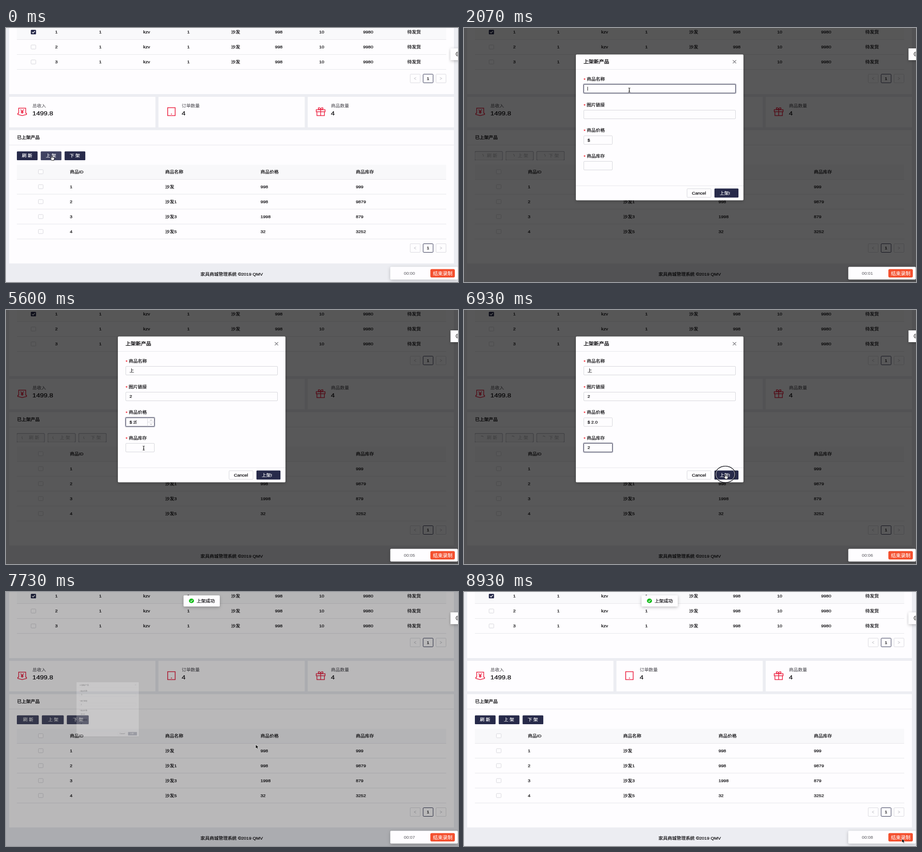
An HTML page that plays this animation: 998 px wide and 561 px high, repeating every 8.99 s.

```html
<!DOCTYPE html>
<html lang="zh">
<head>
<meta charset="utf-8">
<style>
  html, body { margin: 0; width: 100%; height: 100%; overflow: hidden; background: #ecedf2; }
  svg { display: block; width: 998px; height: 561px; }
  text { font-family: "Liberation Sans", "Noto Sans CJK SC", "Noto Sans CJK", sans-serif; white-space: pre; }
</style>
</head>
<body>
<svg id="stage" viewBox="0 0 998 561"></svg>
<script>
const LOOP = 8990, NAVY = '#272a4a', INK = '#0b0a0d', RED = '#ec1f3f', PAPER = '#fefdff';
const ORIGIN = [101.5, 282.5];

// ---- markup helpers ----
const rect = (x, y, w, h, fill, more = '') =>
  `<rect x="${x}" y="${y}" width="${w}" height="${h}" fill="${fill}" ${more}/>`;
const frame = (x, y, w, h, stroke, fill = PAPER, more = '') =>
  rect(x + .5, y + .5, w - 1, h - 1, fill, `stroke="${stroke}" rx="1.5" ${more}`);
const path = (d, stroke, width = 1, more = '') =>
  `<path d="${d}" fill="none" stroke="${stroke}" stroke-width="${width}" ${more}/>`;
// Screen is 16:10 shown as 16:9, so glyphs are slightly wide; y is the line's centre.
const text = (x, y, str, { size = 9, fill = INK, bold = .25, id = '' } = {}) =>
  `<text ${id && `id="${id}"`} transform="translate(${x} ${y + size * .365}) scale(1.11 1)" font-size="${size}"
    fill="${fill}" stroke="${fill}" stroke-width="${bold}">${str}</text>`;
const checkbox = (x, y) => frame(x, y - 5, 11.5, 10, '#d5d5da');
const line = (y, x = 24, w = 948) => rect(x, y, w, 1, '#e6e6ea');

function pager(y) {
  return [892, 920.5, 949].map((x, i) =>
    frame(x, y - 10, 23, 20, i === 1 ? NAVY : '#d9d9de')).join('') +
    text(929, y, '1') +
    path(`M905.5 ${y - 2.5}l-4.5 2.5l4.5 2.5M958 ${y - 2.5}l4.5 2.5l-4.5 2.5`, '#b9b9bf', .9);
}

function orders() {
  const cols = [108.4, 205.6, 303, 400, 497, 594, 691.5, 788.5, 886];
  let s = rect(7, 0, 982, 146, PAPER) + rect(24, 0, 948, 25, '#f9f9fb');
  for (let i = 0; i < 3; i++) {
    const y = 9 + 33 * i;
    [i + 1, 1, 'kzv', 1, '沙发', 998, 10, 9980, '待发货'].forEach((v, k) => s += text(cols[k], y, v));
    s += line(y + 16) + (i ? checkbox(54.8, y) :
      rect(54.8, 4, 11.5, 10, NAVY, 'rx="1.5"') + path('M57.6 9l2.2 2.3l4-4.6', '#fff', 1.4));
  }
  return s + pager(111.5);
}

function stats() {
  const icons = [
    path('M28 188.5V177h15.5v11.5M25.5 188.5h2.5M43.500 188.500h2.500M26 188.500v2.500l9.700 2.500l9.700-2.500v-2.500' +
      'M32.300 180l3.400 4.300l3.400-4.300M35.700 184.300v5M32.800 184.800h5.800M32.800 187h5.800', RED, 1.5),
    path('M357 176h16.500v17.500h-16.500z', RED, 1.6) + rect(364.3, 189.2, 2, 1.8, RED),
    path('M685 180.500h19.500v4.500h-19.500zM686.500 185v8.500h16.500v-8.500M694.700 180.500v13' +
      'M694.700 180.300c-6 0-6.500-4.300-3.500-4.300c2 0 3.500 2 3.500 4.300c0-2.300 1.500-4.300 3.500-4.300c3 0 2.500 4.300-3.500 4.300', RED, 1.5),
  ];
  return [['总收入', '1499.8'], ['订单数量', '4'], ['商品数量', '4']].map(([label, value], i) => {
    const x = 7 + 329.6 * i;
    return rect(x, 152, 323, 67.5, PAPER) + icons[i] +
      text(x + 51.3, 172, label, { fill: '#55545a', bold: .1 }) +
      text(x + 51.3, 188, value, { size: 13.5 });
  }).join('');
}

function button(x, label, i) {
  return `<g class="btn"><rect y="272.5" height="19.500" rx="1.500" fill="${NAVY}"/>
    <rect y="273" height="18.500" rx="1.500" fill="#f5f5f6" stroke="#d9d9dd"/>
    ${text(0, 282, label, { fill: '#fff' })}${text(0, 282, label, { fill: '#bbbbbf' })}
    <path d="M0 -3.600A4 3.600 0 0 1 4 0" fill="none" stroke="#aaaaaf"/></g>`;
}

function products() {
  const cols = [141, 351.5, 562, 772.5];
  let s = rect(7, 225.5, 982, 294.5, PAPER) + line(258, 7, 982) +
    text(24.5, 241.5, '已上架产品', { bold: .35 }) + rect(24, 302, 948, 32, '#f8f8fa') + line(334);
  ['刷 新', '上 架', '下 架'].forEach(label => s += button(0, label));
  const rows = [['商品ID', '商品名称', '商品价格', '商品库存'], [1, '沙发', 998, 999],
    [2, '沙发1', 998, 9879], [3, '沙发3', 1998, 879], [4, '沙发5', 32, 3252]];
  rows.forEach((row, i) => {
    const y = 317.5 + 33 * i;
    row.forEach((v, k) => s += text(cols[k], y, v));
    s += checkbox(71, y) + (i ? line(y + 15.5 + .5 - .0) : '');
  });
  return s + pager(486) + text(429.5, 544, '家具商城管理系统 ©2019 QMV');
}

const inputs = [[124, 336], [181, 336], [237.5, 64], [294, 64]];
function modal() {
  let s = rect(247, 58.5, 370, 322, PAPER, 'rx="2" filter="url(#shadow)"') +
    line(91, 247, 370) + line(348, 247, 370) +
    text(264, 74.5, '上架新产品', { size: 10.2, bold: .35 }) + path('M593.500 71l7.500 7M601 71l-7.500 7', '#77777c', 1.1);
  ['商品名称', '图片链接', '商品价格', '商品库存'].forEach((label, i) => {
    const [y, w] = inputs[i];
    s += text(264.3, y - 10.5, '*', { fill: '#f0202c' }) + text(271, y - 11.5, label) +
      `<rect class="glow" x="263.500" y="${y - .5}" width="${w + 1}" height="21" rx="2" fill="none" stroke="${NAVY}" stroke-opacity=".3" stroke-width="2"/>` +
      frame(264, y, w, 20, '#d5d5da', PAPER, 'class="field"') +
      text(272.8, y + 10, '', { id: 'value' + i });
  });
  s += `<g id="spin">${path('M312.500 238.500v18M312.500 247.500h15', '#d9d9de')}
    ${path('M318 244.500l2.300-2l2.300 2M318 251l2.300 2l2.300-2', '#88888d', .9)}</g>`;
  s += rect(0, 0, 1, 8.5, INK, 'id="caret"');
  s += frame(492, 354.5, 54, 20, '#d5d5da') + text(503.3, 364.5, 'Cancel') +
    rect(553, 354.5, 53, 20, NAVY, 'rx="1.5" id="ok"') + text(564.8, 364.5, '上架!', { fill: '#fff' });
  return s;
}

const cursors = `
  <g id="arrow"><path d="M0 0V8.700l2.200-1.900l1.500 3.200l1.700-.7l-1.500-3.100h3z" fill="#000" stroke="#fff" stroke-width=".7"/></g>
  <g id="beam">${path('M-2.200-4.500q2.200 0 2.200 1.300v6.400q0 1.300-2.200 1.300M2.200-4.500q-2.200 0-2.200 1.300v6.400q0 1.300 2.200 1.300M-1.200 .800h2.400', '#111', 1.1)}</g>
  <g id="hand"><path d="M-1 .800q1-1.200 2 0v3.200q1-.8 1.700 .1q1-.5 1.600 .3q1.600-.3 1.600 1.200q0 2.200-1.100 3.600v1.200h-4.800q-.6-1.500-3.200-4q0-1.400 2.200-.3z" fill="#fff" stroke="#000" stroke-width=".9"/></g>`;

const $ = id => document.getElementById(id);
$('stage').innerHTML = `
  <defs><filter id="shadow" x="-20%" y="-30%" width="140%" height="170%">
    <feDropShadow dx="0" dy="2" stdDeviation="3.500" flood-opacity=".25"/></filter></defs>
  ${rect(0, 0, 998, 561, '#ecedf2')}${orders()}${stats()}${products()}
  ${rect(0, 0, 998, 561, '#000', 'id="mask"')}
  <g id="modal">${modal()}</g>
  <g>${rect(981.5, 45, 20, 26, PAPER, 'filter="url(#shadow)"')}
    ${path('M993.300 57.500l2-4h5M993.300 57.500l2 4h5', '#333', 1.200)}<circle cx="998" cy="57.500" r="1.700" fill="none" stroke="#333"/></g>
  <g id="toast">${rect(392, 7.5, 80, 24.5, PAPER, 'rx="2" filter="url(#shadow)"')}
    <ellipse cx="409.500" cy="19.500" rx="5.600" ry="5.100" fill="#16bd1c"/>
    ${path('M407 19.600l1.800 1.800l3.200-3.700', '#fff', 1.1)}${text(421, 19.5, '上架成功')}</g>
  ${rect(848.5, 527.5, 149, 28, PAPER, 'rx="2" filter="url(#shadow)"')}
  ${text(878.5, 542, '', { size: 8.8, fill: '#66656b', bold: .1, id: 'clock' })}
  ${rect(937, 532.5, 54, 18.5, '#f4502f', 'rx="3"')}
  ${text(942.7, 542, '结束录制', { size: 9.7, fill: '#fff', bold: .15 })}
  <g id="ring"><ellipse rx="22" ry="18" fill="none" stroke="#16161e" stroke-width="1.300"/>
    <ellipse rx="20.800" ry="16.800" fill="none" stroke="#fff" stroke-width=".8"/></g>
  <g id="cursor">${cursors}</g>`;

// ---- timeline ----
const typed = [
  [[0, ''], [3600, 's'], [3740, 'sh'], [3870, 'sha'], [4000, 'shan'], [4130, 'shang'], [4300, '上']],
  [[0, ''], [4900, '2']],
  [[0, '$'], [5450, '$ 2'], [5720, '$ 2.0']],
  [[0, ''], [6300, '2']],
];
const focusSteps = [[0, -1], [1760, 0], [4600, 1], [5300, 2], [5720, 3], [7200, -1]];
const cursorSteps = [[0, 'hand'], [620, 'arrow'], [1480, 'beam'], [2160, 'arrow'], [2850, 'beam'], [3130, 'arrow'],
  [4520, 'beam'], [5110, 'arrow'], [5180, 'beam'], [6480, 'arrow'], [6800, 'hand'], [7420, 'arrow']];
const route = [[0, 101, 282], [600, 101, 282], [1330, 350, 150], [1530, 365, 137], [2080, 365, 137], [2700, 259, 168],
  [2860, 280, 182], [3000, 304, 188], [3270, 310.5, 155], [4400, 310.5, 155], [4600, 325, 190], [4980, 325, 190],
  [5240, 300, 248], [5360, 300, 248], [5580, 304, 305], [6380, 304, 305], [6860, 577, 363], [7400, 577, 363],
  [7730, 551, 337], [8330, 960, 543], [8500, 960, 543], [8800, 967, 545]];

const ramp = (t, a, b) => Math.min(1, Math.max(0, (t - a) / (b - a)));
const at = (steps, t) => steps.filter(s => s[0] <= t).pop();
const bezier = (x1, y1, x2, y2) => x => {
  const f = (p, q, s) => 3 * (1 - s) ** 2 * s * p + 3 * (1 - s) * s * s * q + s ** 3;
  let lo = 0, hi = 1;
  for (let i = 0; i < 20; i++) {
    const mid = (lo + hi) / 2;
    f(x1, x2, mid) < x ? lo = mid : hi = mid;
  }
  return f(y1, y2, lo);
};
const easeIn = bezier(.08, .82, .17, 1), easeOut = bezier(.78, .14, .15, .86), glide = bezier(.4, .1, .5, .95);
const set = (el, attrs) => { for (const k in attrs) el.setAttribute(k, attrs[k]); };
const show = (el, on) => el.style.display = on ? '' : 'none';

function pointer(t) {
  const i = route.findLastIndex(p => p[0] <= t), [a, x, y] = route[i], [b, u, v] = route[i + 1] || route[i];
  const k = b > a ? glide(ramp(t, a, b)) : 0;
  return [x + (u - x) * k, y + (v - y) * k];
}

const buttons = [...document.querySelectorAll('.btn')];
function drawButtons(t) {
  const load = ramp(t, 500, 800) - ramp(t, 7475, 7780);
  buttons.forEach((g, i) => {
    const [base, off, label, dim, arc] = g.children, extra = 15.5 * load;
    const x = 24 + i * (52.7 + extra), tx = `translate(${x + 11.2 + extra} 285.300) scale(1.110 1)`;
    set(base, { x, width: 45.7 + extra, fill: i === 1 && t < 500 ? '#404361' : NAVY });
    set(off, { x: x + .5, width: 44.7 + extra, opacity: load });
    set(label, { transform: tx, opacity: 1 - load });
    set(dim, { transform: tx, opacity: load });
    set(arc, { transform: `translate(${x + 15} 282) rotate(${t * .36 % 360})`, opacity: load });
  });
}

const fields = [...document.querySelectorAll('.field')], glows = [...document.querySelectorAll('.glow')];
function drawForm(t, mx, my) {
  const [since, focus] = at(focusSteps, t);
  fields.forEach((el, i) => {
    const [y, w] = inputs[i], hover = i < 2 && mx > 264 && mx < 264 + w && my > y && my < y + 20;
    el.setAttribute('stroke', focus === i || hover ? '#3b3d55' : '#d5d5da');
    show(glows[i], focus === i);
    $('value' + i).textContent = at(typed[i], t)[1];
  });
  if (focus >= 0) {
    const edit = Math.max(since, at(typed[focus], t)[0]), value = $('value' + focus);
    const width = value.textContent ? value.getComputedTextLength() * 1.11 + .3 : 0;
    set($('caret'), { x: 272.5 + width, y: inputs[focus][0] + 5.8 });
    show($('caret'), (t - edit) % 1000 < 500);
  } else show($('caret'), false);
  $('spin').setAttribute('opacity', ramp(t, 5200, 5300) - ramp(t, 5600, 5800));
  $('ok').setAttribute('fill', t > 7200 ? '#404361' : NAVY);
}

function render(t) {
  const [mx, my] = pointer(t), leaving = t > 7000;
  const open = leaving ? 1 - easeOut(ramp(t, 7615, 7815)) : easeIn(ramp(t, 500, 700));
  const scale = .2 + .8 * open, [ox, oy] = ORIGIN;
  set($('mask'), { opacity: .65 * (ramp(t, 500, 700) - ramp(t, 7615, 7815)) });
  set($('modal'), { opacity: open, transform: `translate(${ox} ${oy}) scale(${scale}) translate(${-ox} ${-oy})` });
  show($('modal'), open > 0);
  drawButtons(t);
  drawForm(t, mx, my);

  const drop = easeIn(ramp(t, 7480, 7700));
  set($('toast'), { opacity: drop, transform: `translate(0 ${-28 * (1 - drop)})` });
  $('clock').textContent = '00:0' + Math.max(0, Math.floor((t - 500) / 1000));

  set($('cursor'), { transform: `translate(${mx} ${my})` });
  const kind = at(cursorSteps, t)[1];
  for (const id of ['arrow', 'beam', 'hand']) show($(id), id === kind);
  set($('ring'), { transform: `translate(${mx} ${my})` });
  show($('ring'), (t >= 470 && t < 600) || (t >= 6900 && t < 7070));
}

const start = performance.now();
function tick() {
  render((performance.now() - start) % LOOP);
  requestAnimationFrame(tick);
}
tick();
</script>
</body>
</html>
```
